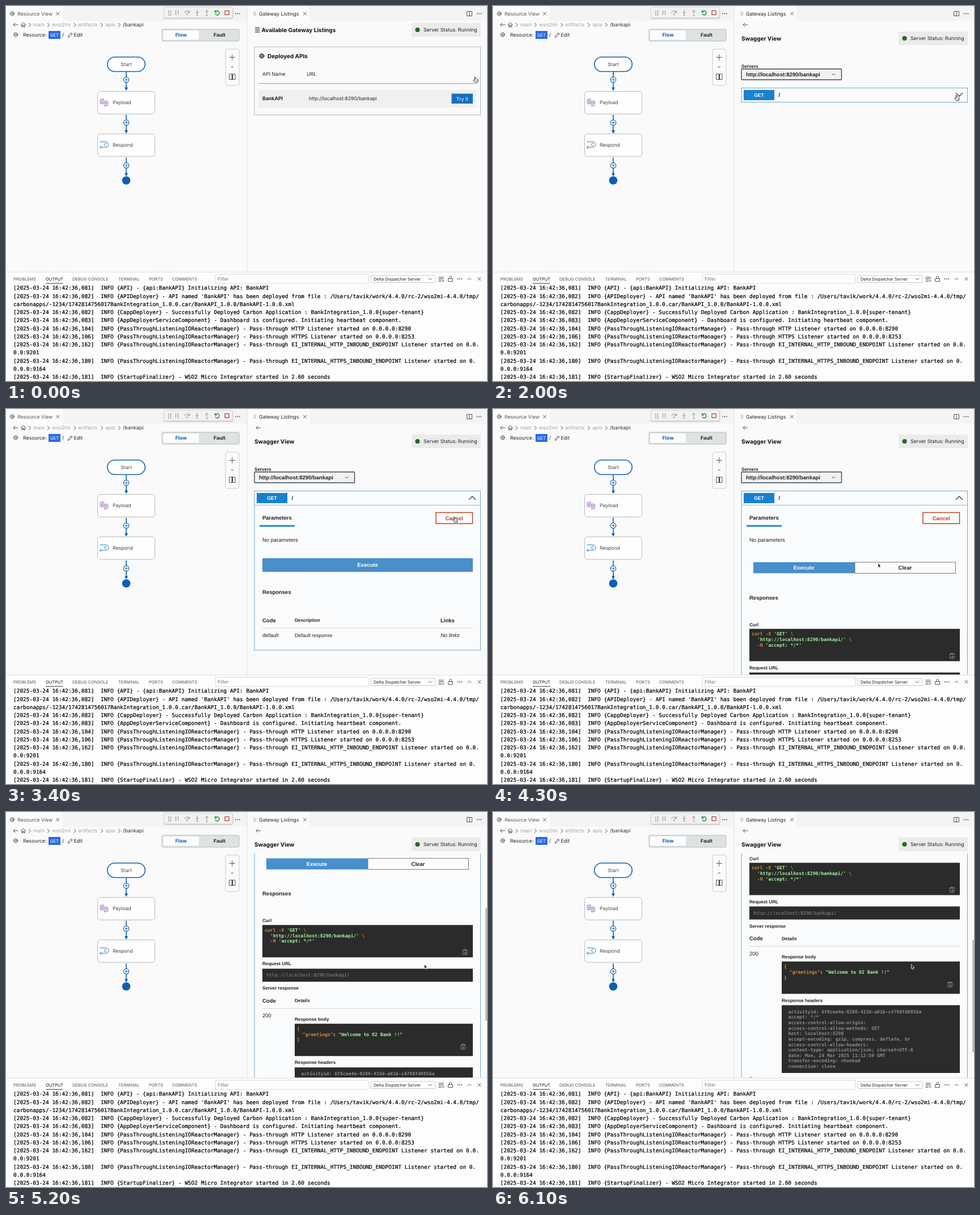
An HTML page for the animation above (6200 ms loop, 848 px wide and 661 px high).

```html
<!DOCTYPE html>
<html lang="en">
<head>
<meta charset="utf-8">
<title>Trying out an API</title>
<style>
html, body { margin: 0; width: 100%; height: 100%; overflow: hidden; background: #fafafa; }
svg { display: block; width: 848px; height: 661px; }
text { font: 8.75px Inter, "Open Sans", sans-serif; fill: #222; text-rendering: geometricPrecision; }
.mid { text-anchor: middle; }
.bold { font-weight: 700; }
.title { font-size: 10px; font-weight: 700; fill: #111; }
.path text { font-size: 8.9px; fill: #a5a5a5; }
.path .here { fill: #333; }
.node { font-size: 8.65px; fill: #444; }
.tabs text { font-size: 7.4px; fill: #555; }
.sw text { font: 9.5px "Liberation Sans", Arial, sans-serif; fill: #222; }
.sw .b { font-weight: 700; }
.sw .s { font-size: 8.15px; font-weight: 700; }
.sw .i { font-style: italic; }
.sw .white { fill: #fff; }
.sw .code { font: 700 8.14px "DejaVu Sans Mono", monospace; fill: #8b8b8b; white-space: pre; }
.sw .code.key { fill: #d98a35; }
.val { fill: #a2f5a2; }
#log text { font: 9.488px "DejaVu Sans Mono", monospace; fill: #000; stroke: #000; stroke-width: .22px; white-space: pre; }
.ic { fill: none; stroke: #555; stroke-width: 1; stroke-linecap: round; stroke-linejoin: round; }
.blue { fill: none; stroke: #0d62b0; stroke-width: 1.6; }
.box { fill: #fff; fill-opacity: .85; stroke: #b9b9b9; }
.dark { fill: #2b2b2b; }
</style>
</head>
<body>
<svg viewBox="0 0 848 661">
  <defs>
    <pattern id="dots" width="13.3" height="13.3" patternUnits="userSpaceOnUse">
      <circle cx="6" cy="6" r=".6" fill="#d8d8d8"/>
    </pattern>
    <clipPath id="view"><rect x="426" y="73" width="422" height="395"/></clipPath>
    <clipPath id="logView"><rect y="493" width="848" height="168"/></clipPath>
    <g id="link">
      <path class="blue" d="M0 0V32"/>
      <path d="M-3 27.5H3L0 33.5Z" fill="#0d62b0"/>
      <circle class="blue" cy="14" r="4.7" style="fill:#fff;stroke-width:1.2"/>
      <path class="blue" style="stroke-width:1.1" d="M-2.6 14H2.6M0 11.4V16.6"/>
    </g>
    <g id="gear" class="ic">
      <circle r="3.8" stroke-dasharray="1.7 1.3" style="stroke-linecap:butt"/>
      <circle r="2.9" style="stroke-width:.8"/><circle r="1" style="stroke-width:.8"/>
    </g>
    <path id="next" class="ic" d="M-1.7 -3L1.7 0L-1.7 3"/>
    <path id="back" class="ic" d="M4 0H-4M-1 -3L-4 0L-1 3"/>
    <path id="close" class="ic" d="M-2.6 -2.6L2.6 2.6M2.6 -2.6L-2.6 2.6"/>
    <g id="more" fill="#444"><circle cx="-3.4" r=".9"/><circle r=".9"/><circle cx="3.4" r=".9"/></g>
    <g id="status">
      <rect x="715" y="-12" width="122" height="24" fill="#ebebeb"/>
      <circle cx="725.5" r="4" fill="#1d6b25"/>
      <text x="736" y="3.2">Server Status: Running</text>
    </g>
    <path id="copy" class="ic" style="stroke:#8a8a8a" d="M1 4.5H-4V-3.5H-2M2 -3.5H3.5V-1M-2 -4.5H2V-2.5H-2ZM5 1.5H-1M1 -.5L-1 1.5L1 3.5M3.5 4V4.5H1"/>
  </defs>

  <rect width="848" height="661" fill="#fafafa"/>
  <rect y="66" width="424" height="402" fill="url(#dots)"/>

  <!-- tab bars -->
  <rect width="848" height="26" fill="#f4f4f4"/>
  <path d="M0 0H100V26H0ZM426 0H535V26H426Z" fill="#fbfbfb"/>
  <path d="M425 0V468" stroke="#e2e2e2"/>
  <use href="#gear" x="11" y="13.5"/>
  <text x="20.5" y="16.8" style="fill:#555">Resource View</text>
  <use href="#close" x="91" y="13.5"/>
  <path class="ic" style="stroke:#aaa" d="M436 11H441M437 13.5H441M436 16H441"/>
  <text x="446" y="16.8">Gateway Listings</text>
  <use href="#close" x="527" y="13.5"/>
  <use href="#more" x="408.5" y="13.5"/>
  <path class="ic" d="M813 9.5H821.5V17.5H813ZM817.2 9.5V17.5"/>
  <use href="#more" x="834" y="13.5"/>

  <!-- debug toolbar -->
  <rect x="278" y="3" width="122.5" height="20" rx="3" fill="#000" opacity=".14"/>
  <rect x="278" y="2" width="121.5" height="19" rx="3" fill="#f1f1f1" stroke="#d2d2d2"/>
  <path d="M287 8.5V17M290.5 8.5V17" stroke="#666" stroke-width="1.4" stroke-dasharray="1.4 1.9"/>
  <g class="ic" style="stroke:#8b8b8b">
    <path d="M299.5 8V15.5M303.5 8V15.5M315 12C316 8 321 7.5 323 11.5M323.3 8V11.8H319.6"/>
    <path d="M337 7V13M334.5 10.7L337 13.2L339.5 10.7M354 14V7.5M351.5 10L354 7.5L356.5 10"/>
    <circle cx="319" cy="15" r=".8"/><circle cx="337" cy="16" r=".8"/><circle cx="354" cy="16.5" r=".8"/>
  </g>
  <path class="ic" style="stroke:#2d8a35;stroke-width:1.4" d="M368.5 8V10.8H371.3M368.8 10.5A3.8 3.8 0 1 1 369 14"/>
  <rect class="ic" x="386" y="8.3" width="7" height="7" style="stroke:#b5452c;stroke-width:1.3"/>

  <!-- resource header -->
  <g class="path">
    <use href="#back" x="17" y="33"/>
    <path class="ic" d="M26.5 33L30.5 29L34.5 33M27.8 32V37H29.5V34H31.5V37H33.2V32"/>
    <use href="#next" x="42" y="33.3"/><text x="48" y="36.3">main</text>
    <use href="#next" x="75" y="33.3"/><text x="81" y="36.3">wso2mi</text>
    <use href="#next" x="121.5" y="33.3"/><text x="127" y="36.3">artifacts</text>
    <use href="#next" x="169" y="33.3"/><text x="175.5" y="36.3">apis</text>
    <use href="#next" x="200" y="33.3"/><text class="here" x="206" y="36.3">/bankapi</text>
  </g>
  <use href="#gear" x="17" y="50.5"/>
  <text x="30" y="54.3">Resource:</text>
  <rect x="75" y="44" width="21" height="14" fill="#2b6ae6"/>
  <text class="mid" x="85.5" y="53.8" style="font-size:7.6px;fill:#fff">GET</text>
  <text x="99" y="54.3">/</text>
  <path class="ic" d="M109.5 55L110.2 52L115 47.2L117 49.2L112.3 54ZM113.8 48.5L115.8 50.5"/>
  <text x="119.5" y="54.3">Edit</text>
  <rect x="275" y="41" width="136" height="21" rx="2" fill="#dfe2e2" stroke="#b7bbbb"/>
  <rect x="277" y="43" width="63" height="16.5" rx="2" fill="#fcfcfc"/>
  <text class="mid bold" x="308.5" y="54.2" style="fill:#0b63b8">Flow</text>
  <text class="mid bold" x="376.5" y="54.2" style="font-size:8.6px">Fault</text>

  <!-- flow diagram -->
  <use href="#link" x="212" y="116"/>
  <use href="#link" x="212" y="191.5"/>
  <use href="#link" x="212" y="267"/>
  <rect class="blue" x="178.8" y="90" width="66.4" height="25.5" rx="12.7" style="fill:#fff"/>
  <text class="mid node" x="212" y="105.8">Start</text>
  <rect class="box" x="161.5" y="150.5" width="101" height="39.7" rx="5"/>
  <text class="node" x="188" y="173.2">Payload</text>
  <rect class="box" x="161.5" y="225.3" width="101" height="39.7" rx="5"/>
  <text class="node" x="188" y="248">Respond</text>
  <circle cx="212" cy="307.5" r="7.3" fill="#0b5fb3"/>
  <g class="ic" style="stroke:#8a55a5;stroke-width:.8">
    <path d="M166 167V164.5H172M170.3 162.8L172 164.5L170.3 166.2M179.5 173V175.5H173.5M175.2 173.8L173.5 175.5L175.2 177.2"/>
    <rect x="165.5" y="167.5" width="14.5" height="5" rx="2.5"/>
    <circle cx="169" cy="170" r="1"/><circle cx="172.8" cy="170" r="1"/><circle cx="176.6" cy="170" r="1"/>
  </g>
  <path class="ic" style="stroke:#2b7cc0" d="M166 239.5H176C182.5 239.5 182.5 249 176 249H165.5M168.2 246.3L165.5 249L168.2 251.7M177 242.5A2.2 2.2 0 1 0 177 246"/>

  <!-- zoom control -->
  <rect x="387" y="76" width="24" height="64" rx="3" fill="#fbfbfb" stroke="#c9c9c9"/>
  <path class="ic" d="M394 90.5H403.5M398.75 85.7V95.3M397 107.5H400.5"/>
  <path class="ic" d="M394 120H404V129.5H394Z"/>
  <rect x="397.8" y="120" width="2.4" height="9.5" fill="#444"/>

  <!-- service list -->
  <g id="list">
    <path class="ic" style="stroke:#222" d="M439.5 38H447M439.5 40.7H447M439.5 43.4H447M439.5 46.1H447"/>
    <text class="title" x="450.5" y="45.7">Available Gateway Listings</text>
    <use href="#status" y="42"/>
    <rect x="438" y="72" width="398.5" height="120" fill="#fafafb" stroke="#b5b9c2"/>
    <g class="ic" style="stroke:#222;stroke-width:.9">
      <circle cx="451" cy="88" r="4"/><ellipse cx="451" cy="88" rx="1.8" ry="4"/><path d="M447 86.7H455M447 89.3H455"/>
    </g>
    <text class="title" x="461" y="92.2">Deployed APIs</text>
    <text x="452" y="123.3">API Name</text>
    <text x="530" y="123.3">URL</text>
    <path d="M445 136.7H829" stroke="#999"/>
    <rect x="445" y="148" width="384.5" height="31" fill="#f0f0f0"/>
    <text class="bold" x="452" y="166.4">BankAPI</text>
    <text x="534" y="166.4" style="font-size:8.57px">http://localhost:8290/bankapi</text>
    <rect x="785.5" y="154.5" width="37.5" height="17.5" fill="#1270c2"/>
    <text class="mid" x="804.3" y="166.5" style="fill:#fff">Try it</text>
  </g>

  <!-- API console -->
  <g id="console">
    <use href="#back" x="445" y="33"/>
    <text class="title" x="438" y="60.7">Swagger View</text>
    <use href="#status" y="57"/>
    <g clip-path="url(#view)"><g id="scroll" class="sw">
      <text class="s" x="438" y="108.5">Servers</text>
      <rect x="438" y="111" width="176.5" height="19" rx="1" fill="#f0f1f3" stroke="#434653" stroke-width="1.4"/>
      <text class="b" x="446" y="124">http://localhost:8290/bankapi</text>
      <path class="ic" d="M598 119.3L600.5 122L603 119.3"/>
      <rect id="op" x="438" y="144.5" width="398.5" fill="#fafbfc" stroke="#6fa8cf"/>
      <rect x="442" y="148" width="54" height="18" fill="#1782d0"/>
      <text class="b white mid" x="469" y="160.2" style="font-size:8.6px">GET</text>
      <text class="b" x="503.5" y="160.4">/</text>
      <path id="caret" class="ic" style="stroke:#333;stroke-width:1.2"/>
      <g id="params">
        <path d="M438 169.5H836.5" stroke="#8dbbd9"/>
        <text class="b" x="452" y="195.4">Parameters</text>
        <rect x="447" y="204.7" width="62" height="2.8" fill="#1782d0"/>
        <text x="452" y="233.6">No parameters</text>
        <rect id="toggle" x="758" y="182.5" width="64.5" height="19.5" fill="none" stroke-width="1.5"/>
        <text id="toggleText" class="b mid" x="790.3" y="195.6"></text>
      </g>
      <g id="execute">
        <rect x="452" y="263" width="371" height="24" rx="1" fill="#488fcc"/>
        <text class="b white mid" x="637.5" y="278.3">Execute</text>
      </g>
      <g id="docs">
        <text class="b" x="452" y="326.4">Responses</text>
        <text class="b" x="452" y="375.9">Code</text>
        <text class="s" x="509" y="375.3">Description</text>
        <text class="b" x="766" y="375.9">Links</text>
        <path d="M452 386.3H823" stroke="#d9d9d2"/>
        <text x="452" y="402.3">default</text>
        <text x="509" y="402.2" style="font-size:8.8px">Default response</text>
        <text class="i" x="766" y="402.3">No links</text>
      </g>
      <g id="result">
        <rect x="459" y="270" width="179" height="19.5" fill="#488fcc"/>
        <rect x="638" y="270" width="177.5" height="19.5" fill="#fcfcfc" stroke="#777"/>
        <text class="b white mid" x="548" y="283">Execute</text>
        <text class="b mid" x="726.5" y="283">Clear</text>
        <text class="b" x="452" y="335.8">Responses</text>
        <text class="s" x="452" y="382.5">Curl</text>
        <rect class="dark" x="452" y="387.5" width="371" height="57"/>
        <text class="code key" x="456" y="399.4">curl -X <tspan class="val">'GET'</tspan> \</text>
        <text class="code key" x="465.8" y="409"><tspan class="val">'http://localhost:8290/bankapi/'</tspan> \</text>
        <text class="code key" x="465.8" y="418.6">-H <tspan class="val">'accept: */*'</tspan></text>
        <use href="#copy" x="809.5" y="435"/>
        <text class="s" x="452" y="458.8">Request URL</text>
        <rect class="dark" x="452" y="464.5" width="371" height="23"/>
        <text class="code" x="459" y="478.7" style="font-weight:400">http://localhost:8290/bankapi/</text>
        <text class="s" x="452" y="501.7">Server response</text>
        <text class="b" x="452" y="524">Code</text>
        <text class="s" x="509" y="523.5">Details</text>
        <path d="M452 534.7H823" stroke="#d9d9d2"/>
        <text x="452" y="550.8">200</text>
        <text class="s" x="509" y="556.2">Response body</text>
        <rect class="dark" x="509" y="561.5" width="314" height="57"/>
        <text class="code key" x="513" y="573.3">{</text>
        <text class="code key" x="522.8" y="582.9">"greetings"<tspan fill="#fff">: </tspan><tspan class="val">"Welcome to O2 Bank !!"</tspan></text>
        <text class="code key" x="513" y="592.5">}</text>
        <use href="#copy" x="806" y="602"/>
        <text class="s" x="509" y="632.7">Response headers</text>
        <rect class="dark" x="509" y="638.5" width="314" height="119.5"/>
        <g id="headers"></g>
        <text class="b" x="452" y="771.5">Responses</text>
      </g>
    </g></g>
    <rect id="thumb" x="845" width="4" height="199" rx="1.5" fill="#bdbdbd"/>
  </g>

  <!-- output panel -->
  <rect y="469" width="848" height="192" fill="#fdfdfd"/>
  <path d="M0 469H848" stroke="#dcdcdc"/>
  <g class="tabs">
    <text x="13" y="483.5">PROBLEMS</text>
    <text x="70" y="483.5" style="fill:#111">OUTPUT</text>
    <text x="117" y="483.5">DEBUG CONSOLE</text>
    <text x="198" y="483.5">TERMINAL</text>
    <text x="252" y="483.5">PORTS</text>
    <text x="293" y="483.5">COMMENTS</text>
    <path d="M70 489H100.5" stroke="#333"/>
    <rect x="369" y="473" width="270" height="16" rx="1" fill="#fff" stroke="#d6d6d6"/>
    <text x="373" y="484" style="font-size:8.4px;fill:#777">Filter</text>
    <rect x="643" y="475" width="114" height="12.5" rx="1" fill="#fff" stroke="#c9c9c9"/>
    <text x="648" y="483.9" style="fill:#222">Delta Dispatcher Server</text>
  </g>
  <g class="ic">
    <path d="M745 479.7L748 482.7L751 479.7M763 478H771.5M763 480.5H771.5M763 483H767M763 485.5H767M769 482.7L772 485.7M772 482.7L769 485.7"/>
    <path d="M780 480.5H787.5V485.5H780ZM781.7 480.5V478.5A2 2 0 0 1 785.8 478.5V480.5M814 482.5L817 479.5L820 482.5"/>
  </g>
  <use href="#more" x="800" y="481"/>
  <use href="#close" x="834.5" y="481"/>
  <g clip-path="url(#logView)"><g id="log"></g></g>

  <g id="hand">
    <path d="M-2 -4.5C-1.5 -5.5 -.5 -5 -.3 -4L.3 -1.5L2.7 -1C4.2 -.7 4.5 .3 4.2 1.7L3.5 4.7H-1.2L-3.8 1.5C-4.5 .5 -3.3 -.2 -2.5 .5L-1.5 1.2Z" fill="#fff" stroke="#222" stroke-width=".9" stroke-linejoin="round"/>
    <path d="M.8 1V3M2.4 1.2V3" stroke="#222" stroke-width=".6"/>
  </g>
  <path id="arrow" d="M-.5 -3.5V4L1.2 2.5L2.4 5.2L3.7 4.6L2.5 2H4.8Z" fill="#111" stroke="#fff" stroke-width=".8"/>
</svg>

<script>
const LOOP = 6200, STEP = 100;
const OPEN_CONSOLE = 1000, EXPAND = 2200, TRY = 3000, DONE = 4200, SCROLL = 4600;

const pointer = [
  [0, 828, 130], [200, 828, 130], [700, 805, 164], [1200, 805, 164], [1700, 818, 162],
  [2400, 818, 162], [2800, 792, 195], [3400, 792, 195], [3800, 650, 277],
  [4200, 650, 277], [4500, 738, 272]
];
const offsets = [[4500, 0], [4600, 36], [4800, 104.5], [5200, 188.3], [5600, 234], [6100, 298]];

const el = id => document.getElementById(id);
const show = (id, on) => el(id).style.display = on ? '' : 'none';
const move = (id, x, y) => el(id).setAttribute('transform', `translate(${x} ${y})`);

function lines(id, x, y, step, rows, cls = '') {
  rows.forEach((row, i) => {
    const node = document.createElementNS('http://www.w3.org/2000/svg', 'text');
    node.setAttribute('x', x);
    node.setAttribute('y', y + i * step);
    node.setAttribute('class', cls);
    node.textContent = row;
    el(id).append(node);
  });
}

const info = (ms, text) => `[2025-03-24 16:42:36,${ms}]  INFO ${text}`;
const reactor = '{PassThroughListeningIOReactorManager} - Pass-through ';
lines('log', 13, 500.4, 14.26, [
  info('081', '{API} - {api:BankAPI} Initializing API: BankAPI'),
  info('082', "{APIDeployer} - API named 'BankAPI' has been deployed from file : /Users/tavik/work/4.4.0/rc-2/wso2mi-4.4.0/tmp/"),
  'carbonapps/-1234/1742814756017BankIntegration_1.0.0.car/BankAPI_1.0.0/BankAPI-1.0.0.xml',
  info('082', '{CappDeployer} - Successfully Deployed Carbon Application : BankIntegration_1.0.0{super-tenant}'),
  info('083', '{AppDeployerServiceComponent} - Dashboard is configured. Initiating heartbeat component.'),
  info('104', reactor + 'HTTP Listener started on 0.0.0.0:8290'),
  info('106', reactor + 'HTTPS Listener started on 0.0.0.0:8253'),
  info('162', reactor + 'EI_INTERNAL_HTTP_INBOUND_ENDPOINT Listener started on 0.0.'),
  '0.0:9201',
  info('180', reactor + 'EI_INTERNAL_HTTPS_INBOUND_ENDPOINT Listener started on 0.'),
  '0.0.0:9164',
  info('181', '{StartupFinalizer} - WSO2 Micro Integrator started in 2.60 seconds')
]);
lines('headers', 520.5, 652.8, 9.62, [
  'activityid: 6f8cee4e-0200-433d-a01b-c4798fd0856a',
  'accept: */*',
  'access-control-allow-origin:',
  'access-control-allow-methods: GET',
  'host: localhost:8290',
  'accept-encoding: gzip, compress, deflate, br',
  'access-control-allow-headers:',
  'content-type: application/json; charset=UTF-8',
  'date: Mon, 24 Mar 2025 11:12:59 GMT',
  'transfer-encoding: chunked',
  'connection: close'
], 'code');

// Linear value of a [time, ...values] track
function at(track, t) {
  const i = track.findIndex(k => k[0] > t);
  if (i === 0) return track[0].slice(1);
  if (i < 0) return track[track.length - 1].slice(1);
  const a = track[i - 1], b = track[i], p = (t - a[0]) / (b[0] - a[0]);
  return a.slice(1).map((v, n) => v + (b[n + 1] - v) * p);
}

function draw(t) {
  const open = t >= EXPAND, trying = t >= TRY, done = t >= DONE;
  show('list', t < OPEN_CONSOLE);
  show('console', t >= OPEN_CONSOLE);
  show('params', open);
  show('execute', trying && !done);
  show('docs', open && !done);
  show('result', done);
  move('docs', 0, trying ? 0 : -24);
  el('op').setAttribute('height', done ? 800 : trying ? 280.5 : open ? 256.5 : 25);
  el('caret').setAttribute('d', open ? 'M816.5 159.5L822 154L827.5 159.5' : 'M816.5 153.5L822 159L827.5 153.5');
  const tone = trying ? '#b9481f' : '#555';
  el('toggle').setAttribute('stroke', tone);
  el('toggleText').style.fill = tone;
  el('toggleText').textContent = trying ? 'Cancel' : 'Try it out';

  const [offset] = at(offsets, t);
  move('scroll', 0, -offset);
  show('thumb', t >= SCROLL);
  el('thumb').setAttribute('y', 73 + offset * .51);

  const [x, y] = at(pointer, t), arrow = t > DONE;
  show('hand', !arrow);
  show('arrow', arrow);
  move('hand', x, y);
  move('arrow', x, y);
}

let start;
function tick(now) {
  start ??= now;
  draw(Math.floor((now - start) % LOOP / STEP) * STEP);
  requestAnimationFrame(tick);
}
draw(0);
requestAnimationFrame(tick);
</script>
</body>
</html>
```
